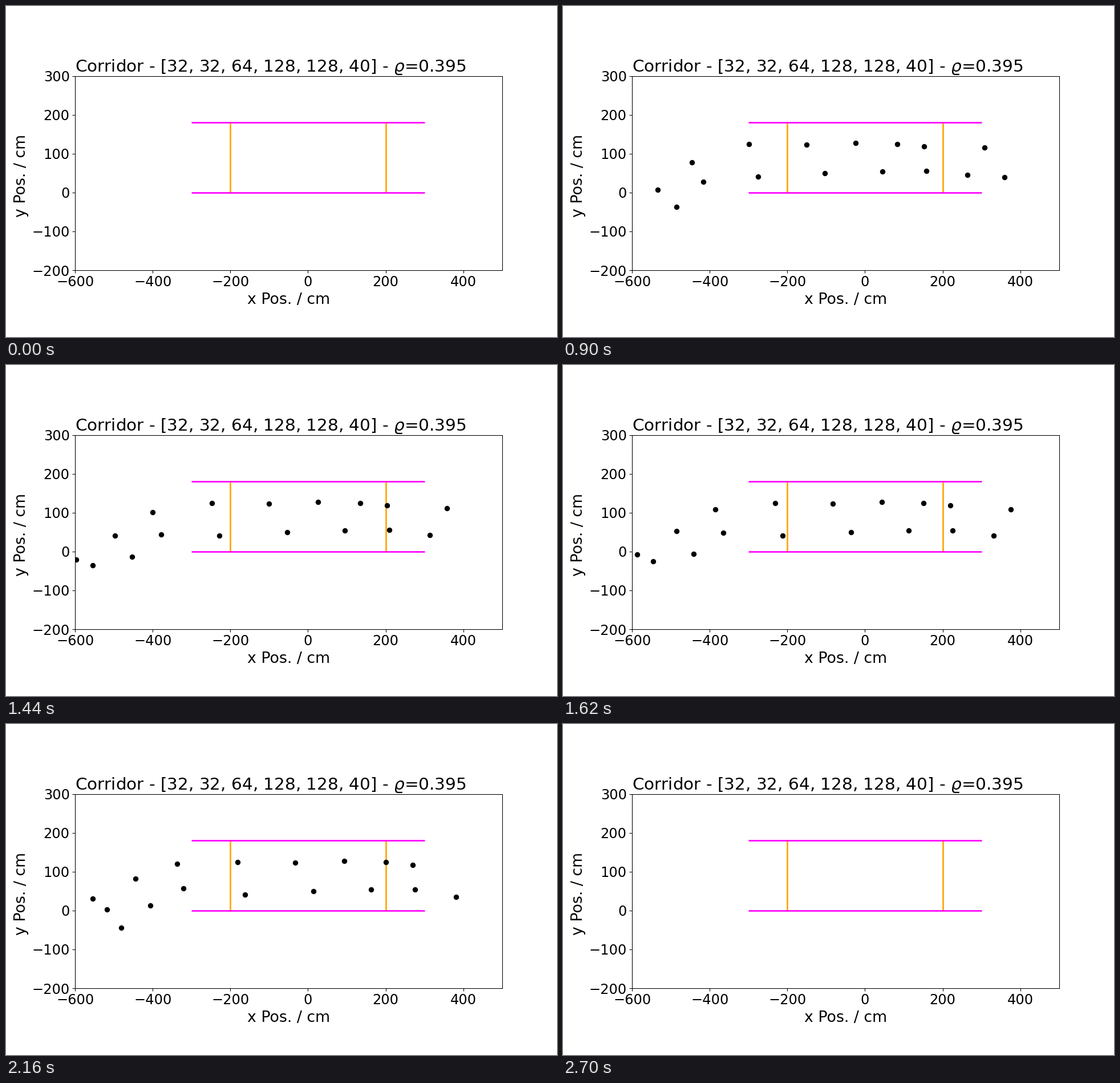
A matplotlib script that plays this animation: 966 px wide and 580 px high, repeating every 3010 ms.

```python
import numpy as np
import matplotlib.pyplot as plt
from matplotlib.animation import FuncAnimation

DPI = 96.6
TICK_MS, LOOP_MS = 10, 3010
START_MS, STEP_MS, STEPS = 240, 60, 41
MID_STEP = 20

ENTRY_X, EXIT_X = -300, 220     # paths bend outside this range
TOP_SPEED = 5.6                 # cm per step along the path
ENTER_Y, LEAVE_X = -52, 386     # tracking area

# (x at the middle step, y of the lane) for both files of pedestrians
UPPER = [(444, 116), (358, 120), (203, 119), (134, 125), (26, 128),
         (-100, 123), (-248, 125), (-401, 124), (-498, 128), (-597, 173)]
LOWER = [(410, 48), (314, 47), (209, 55), (95, 54), (-53, 50),
         (-228, 41), (-378, 58), (-453, 38), (-520, 28), (-554, 107)]


def path_y(x, lane):
    """Climb into the lane, follow it, then sink slightly at the exit."""
    before = np.maximum(ENTRY_X - x, 0)
    after = np.maximum(x - EXIT_X, 0)
    return lane - 0.0022 * before**2 - 0.00045 * after**2


def steady(x):
    return TOP_SPEED


def speeding_up(x):
    return np.interp(x, [-500, -150], [4.3, TOP_SPEED])


def walk(people, speed):
    """Positions of a file at every step, shape (steps, people, 2)."""
    middle, lane = np.array(people, float).T
    x = np.empty((STEPS, len(people)))
    x[MID_STEP] = middle

    def advance(now):
        slope = 0.0044 * np.maximum(ENTRY_X - now, 0)
        return speed(now) / np.hypot(1, slope)

    for k in range(MID_STEP, STEPS - 1):
        x[k + 1] = x[k] + advance(x[k])
    for k in range(MID_STEP, 0, -1):
        x[k - 1] = x[k] - advance(x[k])
    return np.stack([x, path_y(x, lane)], axis=-1)


positions = np.concatenate([walk(UPPER, steady), walk(LOWER, speeding_up)],
                           axis=1)

plt.rcParams["font.family"] = "DejaVu Sans"
fig, ax = plt.subplots(figsize=(10, 580.01 / DPI), dpi=DPI)
fig.subplots_adjust(left=0.1254, right=0.9004)
ax.set_aspect("equal")
ax.set(xlim=(-600, 500), ylim=(-200, 300),
       xticks=range(-600, 500, 200), yticks=range(-200, 301, 100))
ax.tick_params(labelsize=18)
ax.set_xlabel("x Pos. / cm", fontsize=20)
ax.set_ylabel("y Pos. / cm", fontsize=20, y=0.487)
ax.set_title(r"Corridor - [32, 32, 64, 128, 128, 40] - $\varrho$=0.395",
             fontsize=22, loc="left")

ax.vlines([-200, 200], 0, 180, colors="orange", lw=2, zorder=2)
ax.hlines([0, 180], -300, 300, colors="magenta", lw=2, zorder=2.1)
dots = ax.scatter([], [], s=36, c="black", zorder=3)


def update(frame):
    step = (frame * TICK_MS - START_MS) // STEP_MS
    if 0 <= step < STEPS:
        now = positions[step]
        seen = (now[:, 0] < LEAVE_X) & (now[:, 1] > ENTER_Y)
        dots.set_offsets(now[seen])
    else:
        dots.set_offsets(np.empty((0, 2)))
    return [dots]


anim = FuncAnimation(fig, update, frames=LOOP_MS // TICK_MS,
                     interval=TICK_MS, repeat=True, repeat_delay=0)
plt.show()
```
